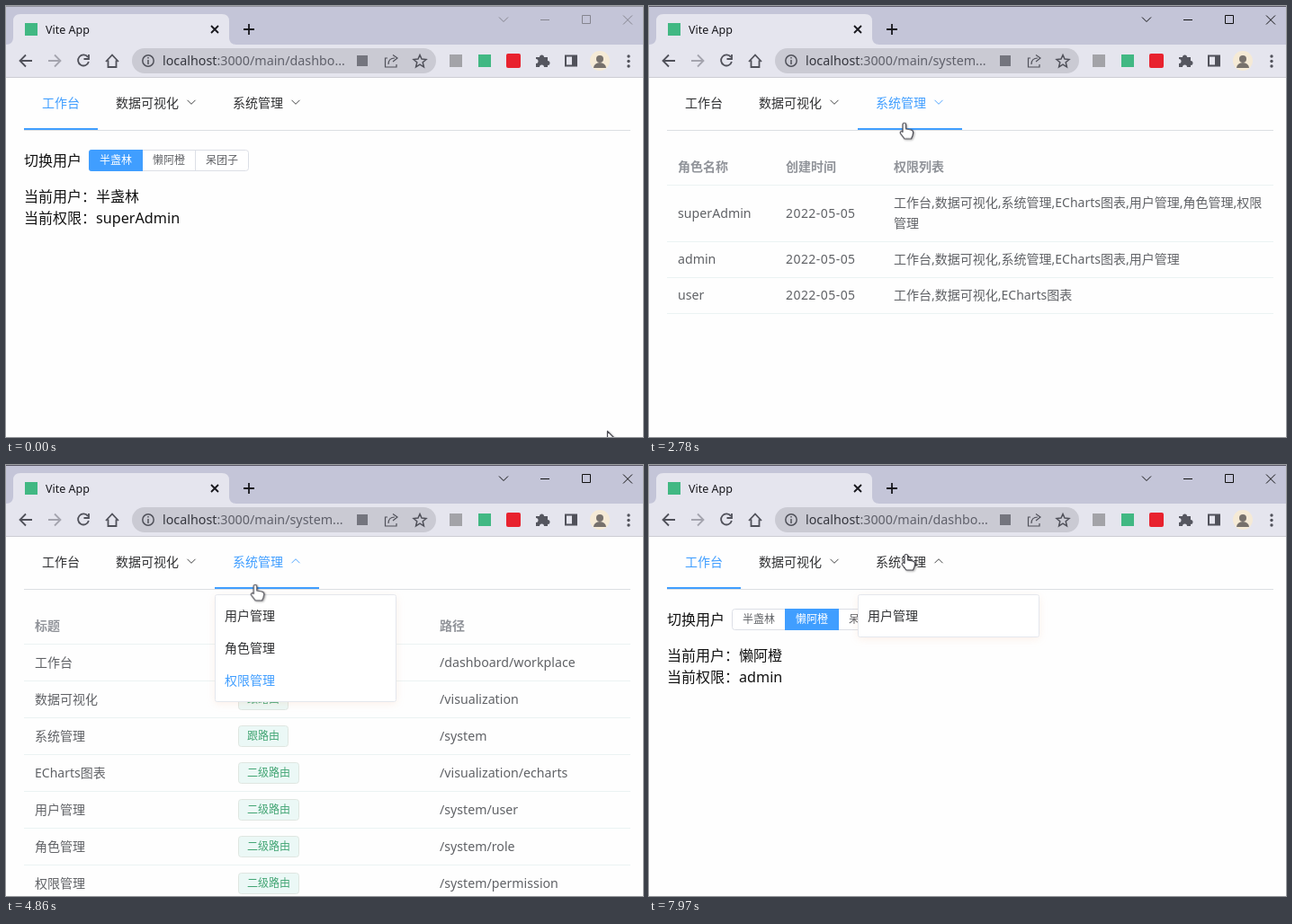
Animation, 708 px wide and 480 px high, one loop 8000 ms. Source, as an HTML page:

```html
<!DOCTYPE html>
<html lang="zh-CN">
<head>
<meta charset="utf-8">
<title>Vite App</title>
<style>
html, body { margin: 0; width: 100%; height: 100%; overflow: hidden; background: #fefefe; }
svg { display: block; }
text { fill: currentColor; font-family: "Noto Sans", "Noto Sans CJK SC", "Noto Sans CJK", sans-serif; font-size: 14px; white-space: pre; }
.line { fill: none; stroke: currentColor; }
.small { font-size: 12px; }
.big { font-size: 16px; }
.bigLatin { font-size: 16.2px; }
.head { font-weight: 700; color: #909399; }
.cell { color: #606266; }
.latin { font-size: 14.2px; }
.date { letter-spacing: .45px; }
.rule { stroke: #ebf3f3; }
.chevron { fill: none; stroke: currentColor; stroke-opacity: 1; stroke-width: .9; }
.bar { stroke: #409eff; stroke-width: 2; }
.panel { fill: #fff; stroke: #e4e7ed; filter: drop-shadow(0 2px 4px #f0a07026); }
.cursor path { fill: #fff; stroke: #4a4a52; stroke-width: 1.2; stroke-linejoin: round; }

/* Every animation shares one 8 s loop: 1% = 80 ms */
.fx { animation: 8s linear infinite; }
.step { animation-timing-function: step-end; }
.focus { animation-name: focus; }
.edge { animation-name: edge; }
.work { animation-name: work; }
.vis { animation-name: vis; }
.sys { animation-name: sys; }
.role { animation-name: role; }
.perm { animation-name: perm; }
.user { animation-name: user; }
.first { animation-name: first; }
.second { animation-name: second; }
.navWork { animation-name: navWork; }
.navVis { animation-name: navVis; }
.navSys { animation-name: navSys; }
.flipVis { animation-name: flipVis; }
.flipSys { animation-name: flipSys; }
.hoverWork { animation-name: hoverWork; }
.dropVis { animation-name: dropVis; }
.dropSys { animation-name: dropSys; }
.dropOne { animation-name: dropOne; }
.hoverVis { animation-name: hoverVis; }
.hoverSys { animation-name: hoverSys; }
.itemRole { animation-name: itemRole; }
.itemPerm { animation-name: itemPerm; }
.btnA { animation-name: btnA; }
.btnB { animation-name: btnB; }
.move { animation-name: move; }
.hand { animation-name: hand; }
.arrow { animation-name: arrow; }
.ring { animation-name: ring; }

@keyframes focus { 0% { color: #85858f } 3.75%, 100% { color: #111 } }
@keyframes edge { 0% { color: #90909c } 3.75%, 100% { color: #5c5a68 } }

/* Routes */
@keyframes work { 0%, 74.75%, 100% { opacity: 1 } 17.5% { opacity: 0 } }
@keyframes vis { 0%, 32.1%, 100% { opacity: 0 } 17.5% { opacity: 1 } }
@keyframes sys { 0%, 74.75%, 100% { opacity: 0 } 32.1% { opacity: 1 } }
@keyframes role { 0%, 49.75%, 100% { opacity: 0 } 32.1% { opacity: 1 } }
@keyframes perm { 0%, 64.75%, 100% { opacity: 0 } 49.75% { opacity: 1 } }
@keyframes user { 0%, 74.75%, 100% { opacity: 0 } 64.75% { opacity: 1 } }
@keyframes first { 0% { opacity: 1 } 90.4%, 100% { opacity: 0 } }
@keyframes second { 0% { opacity: 0 } 90.4%, 100% { opacity: 1 } }

/* Menu bar */
@keyframes navWork {
  0%, 17.5%, 78%, 100% { color: #409eff; stroke-opacity: 1 }
  20.5%, 74.75% { color: #303133; stroke-opacity: 0 }
}
@keyframes navVis {
  0%, 17.5%, 34.4%, 100% { color: #303133; stroke-opacity: 0 }
  20.5%, 32.1% { color: #409eff; stroke-opacity: 1 }
}
@keyframes navSys {
  0%, 32.1%, 77.5%, 100% { color: #303133; stroke-opacity: 0 }
  34.4%, 74.75% { color: #409eff; stroke-opacity: 1 }
}
@keyframes flipVis { 0%, 9.5%, 23.5%, 100% { transform: rotate(0) } 12%, 20.5% { transform: rotate(180deg) } }
@keyframes flipSys {
  0%, 21.8%, 34.4%, 36.5%, 52%, 53%, 67%, 93%, 100% { transform: rotate(0) }
  24.5%, 32%, 39.5%, 50.7%, 54.7%, 64.75%, 96%, 99.99% { transform: rotate(180deg) }
}
@keyframes hoverWork { 0%, 69.5%, 77.3%, 100% { opacity: 0 } 71.3%, 74.8% { opacity: 1 } }

/* Drop-downs */
@keyframes dropVis {
  0%, 13%, 20.4%, 100% { opacity: 0; transform: scaleY(.3) }
  15.5%, 18% { opacity: 1; transform: none }
}
@keyframes dropSys {
  0%, 24.4%, 34%, 40%, 52%, 57.2%, 67%, 100% { opacity: 0; transform: scaleY(.3) }
  27.2%, 32.1%, 43%, 50.7%, 60%, 64.75% { opacity: 1; transform: none }
}
@keyframes dropOne {
  0%, 96.2%, 100% { opacity: 0; transform: scaleY(.3) }
  99.3%, 99.99% { opacity: 1; transform: none }
}
@keyframes hoverVis { 0%, 15%, 100% { opacity: 0 } 16.3%, 21% { opacity: 1 } }
@keyframes hoverSys {
  0%, 35%, 53% { opacity: 0; transform: none }
  28.8%, 42.6%, 61% { opacity: 1; transform: none }
  30%, 44.4% { opacity: 1; transform: translateY(36px) }
  46.6% { opacity: 1; transform: translateY(72px) }
  68%, 100% { opacity: 0; transform: none }
}
@keyframes itemRole { 0%, 51.5%, 100% { color: #303133 } 32.1% { color: #409eff } }
@keyframes itemPerm { 0%, 66%, 100% { color: #303133 } 51.5% { color: #409eff } }

/* User switch */
@keyframes btnA {
  0%, 87.5% { color: #fff; fill-opacity: 1 }
  91%, 100% { color: #606266; fill-opacity: 0 }
}
@keyframes btnB {
  0%, 85.8% { color: #606266; fill-opacity: 0 }
  86.6%, 87.5% { color: #409eff; fill-opacity: 0 }
  91%, 100% { color: #fff; fill-opacity: 1 }
}

/* Pointer */
@keyframes move {
  0%, .875% { transform: translate(668px, 473px) }
  3.75% { transform: translate(560px, 380px) }
  7.5% { transform: translate(290px, 175px) }
  10.4% { transform: translate(165px, 113px) }
  14.4% { transform: translate(165px, 118px) }
  16.5% { transform: translate(166px, 166px) }
  17.4% { transform: translate(167px, 168px) }
  20.9% { transform: translate(240px, 125px) }
  24.4%, 27% { transform: translate(283px, 110px) }
  30.6%, 32.1% { transform: translate(282px, 203px) }
  34.75% { transform: translate(284px, 130px) }
  36.2%, 41% { transform: translate(284px, 108px) }
  45% { transform: translate(278px, 200px) }
  47.5%, 49.5% { transform: translate(276px, 239px) }
  50.5% { transform: translate(276px, 198px) }
  52.1% { transform: translate(281px, 129px) }
  54.7%, 58.5% { transform: translate(284px, 91px) }
  62.5%, 65% { transform: translate(272px, 165px) }
  67.7% { transform: translate(230px, 145px) }
  72.1% { transform: translate(60px, 119px) }
  73.7%, 77.5% { transform: translate(56px, 115px) }
  79% { transform: translate(75px, 130px) }
  83.2% { transform: translate(308px, 181px) }
  86.6%, 88.4% { transform: translate(185px, 172px) }
  89.5% { transform: translate(195px, 155px) }
  92.5% { transform: translate(278px, 105px) }
  94%, 100% { transform: translate(286px, 99px) }
}
@keyframes arrow {
  0%, 66.25%, 79.25%, 88.9% { opacity: 1 }
  9%, 69.5%, 85.75%, 91.1%, 100% { opacity: 0 }
}
@keyframes hand {
  0%, 66.25%, 79.25%, 88.9% { opacity: 0 }
  9%, 69.5%, 85.75%, 91.1%, 100% { opacity: 1 }
}
@keyframes ring {
  0%, 18.1%, 32.4%, 49.9%, 65.4%, 75.1%, 88.5%, 100% { opacity: 0 }
  15.7%, 30.8%, 48.7%, 63.9%, 73.7%, 87.4% { opacity: .72 }
}
</style>
</head>
<body>
<svg width="708" height="480" viewBox="0 0 708 480">
  <defs>
    <path id="chev" d="M-4.5-2.2 0 2.3 4.5-2.2"/>
  </defs>

  <!-- Browser window -->
  <rect width="708" height="44" fill="#c4c5d8"/>
  <path class="line fx step edge" d="M0 .5H708"/>
  <path d="M0 43c5 0 8-3 8-8V17q0-8 8-8H240q8 0 8 8V35c0 5 3 8 8 8H708V79H0z" fill="#e5e5ee"/>
  <path d="M0 79.5H708" stroke="#cdcdd4"/>
  <rect x="21" y="19" width="14" height="14" fill="#41b883"/>
  <text x="44" y="31" style="font-size:12.5px" color="#17171c">Vite App</text>
  <g class="line" color="#17171c" stroke-width="1.8">
    <path d="M228 22l8 8M236 22l-8 8M264 26H276M270 20V32"/>
  </g>
  <g class="line fx step focus">
    <path d="M548 12.5l5 5 5-5M594 15.5H604M640.5 10.5h9v9h-9zM686 10.5l10 10M696 10.5l-10 10"/>
  </g>
  <g class="line" color="#50515a" stroke-width="1.8">
    <path d="M29 61H16M22 54.5 15.5 61 22 67.5"/>
    <path d="M47 61H60M54 54.5 60.5 61 54 67.5" stroke="#a4a4ae"/>
    <path d="M91 57a6 6 0 1 0 .9 5M92 54v5h-5.5"/>
    <path d="M111 62l7-7.5 7 7.5M113.5 60.5V68h9V60.5"/>
  </g>
  <rect x="140" y="47" width="338" height="28" rx="14" fill="#cacad3"/>
  <g class="line" color="#50515a" stroke-width="1.5">
    <circle cx="158" cy="61" r="6.2"/>
    <path d="M158 60V65M158 57V58.5"/>
    <path d="M424 58H421.5V68H434V65M425 65c0-5 3-7 7-7M430 54.5l5 3.5-5 4" stroke-width="1.2"/>
    <path d="M460 54.5l2 4.5 5 .5-3.800 3.300 1.200 5-4.400-2.700-4.400 2.700 1.200-5-3.800-3.300 5-.5z"/>
  </g>
  <rect x="390" y="55" width="12" height="12" fill="#74757e"/>
  <g color="#5f606a" id="urls"></g>
  <rect x="493" y="54" width="14" height="14" fill="#a3a3a8"/>
  <rect x="525" y="54" width="14" height="14" fill="#41b883"/>
  <rect x="556" y="53" width="16" height="16" rx="2" fill="#e8222e"/>
  <path d="M589 57h4a2.500 2.500 0 0 1 5 0h4v4a2.500 2.500 0 0 1 0 5v2h-4a2.500 2.500 0 0 0-5 0h-4v-4a2.500 2.500 0 0 0 0-5z" fill="#55565f"/>
  <path d="M622 55.5h12v11h-12z" class="line" color="#50515a" stroke-width="2"/>
  <path d="M629 55h6v12h-6z" fill="#50515a"/>
  <circle cx="660" cy="61" r="11" fill="#f5ead6"/>
  <path d="M653 69a7 6 0 0 1 14 0" fill="#77716c"/><circle cx="660" cy="59" r="4" fill="#77716c"/>
  <g fill="#50515a"><circle cx="692" cy="56" r="1.7"/><circle cx="692" cy="61.5" r="1.7"/><circle cx="692" cy="67" r="1.7"/></g>

  <!-- Menu bar -->
  <path d="M20 138.5H694" stroke="#dcdfe3"/>
  <rect class="fx hoverWork" x="20" y="80" width="82" height="58" fill="#ebf8f7"/>
  <g class="fx navWork">
    <text x="40" y="113">工作台</text>
    <path class="bar" d="M20 137H102"/>
  </g>
  <g class="fx navVis">
    <text x="122" y="113">数据可视化</text>
    <path class="bar" d="M102 137H232"/>
    <g transform="translate(206 107)"><use href="#chev" class="chevron fx flipVis"/></g>
  </g>
  <g class="fx navSys">
    <text x="252" y="113">系统管理</text>
    <path class="bar" d="M232 137H348"/>
    <g transform="translate(322 107)"><use href="#chev" class="chevron fx flipSys"/></g>
  </g>

  <!-- Workplace -->
  <g class="fx step work" color="#111">
    <text class="big" x="20" y="178">切换用户</text>
    <rect x="92.5" y="160.5" width="177" height="23" rx="3" fill="#fff" stroke="#dcdfe6"/>
    <path d="M151.5 160V184M210.5 160V184" stroke="#dcdfe6"/>
    <g class="fx btnA">
      <path d="M152 160H95q-3 0-3 3v18q0 3 3 3h57z" fill="#409eff"/>
      <text class="small" x="104" y="176" fill-opacity="1">半盏林</text>
    </g>
    <g class="fx btnB">
      <path d="M151 160h60v24h-60z" fill="#409eff"/>
      <text class="small" x="163" y="176" fill-opacity="1">懒阿橙</text>
    </g>
    <text class="small" x="222" y="176" color="#606266">呆团子</text>
    <text class="big" x="20" y="218">当前用户：</text>
    <text class="big" x="20" y="242">当前权限：</text>
    <g class="fx step first">
      <text class="big" x="100" y="218">半盏林</text>
      <text class="bigLatin" x="100" y="242">superAdmin</text>
    </g>
    <g class="fx step second">
      <text class="big" x="100" y="218">懒阿橙</text>
      <text class="bigLatin" x="100" y="242">admin</text>
    </g>
  </g>

  <!-- Tables -->
  <g class="fx step role" id="roles"></g>
  <g class="fx step perm" id="perms"></g>
  <g class="fx step user" id="users"></g>

  <!-- Drop-downs -->
  <g transform="translate(102 144)" color="#303133"><g class="fx dropVis">
    <rect class="panel" x=".5" y=".5" width="201" height="47" rx="2"/>
    <rect class="fx hoverVis" x="1" y="6" width="200" height="36" fill="#ebf8f7"/>
    <text x="11" y="29">ECharts图表</text>
  </g></g>
  <g transform="translate(232 144)" color="#303133"><g class="fx dropSys">
    <rect class="panel" x=".5" y=".5" width="201" height="119" rx="2"/>
    <rect class="fx step hoverSys" x="1" y="6" width="200" height="36" fill="#ebf8f7"/>
    <text x="11" y="29">用户管理</text>
    <text class="fx step itemRole" x="11" y="65">角色管理</text>
    <text class="fx step itemPerm" x="11" y="101">权限管理</text>
  </g></g>
  <g transform="translate(232 144)" color="#303133"><g class="fx dropOne">
    <rect class="panel" x=".5" y=".5" width="201" height="47" rx="2"/>
    <text x="11" y="29">用户管理</text>
  </g></g>

  <!-- Pointer -->
  <g class="cursor fx move">
    <circle class="fx step ring" cx="-3" cy="-2" r="12" fill="#f9ae4e"/>
    <g style="filter:drop-shadow(1px 1px 1px #0005)">
      <path class="fx step arrow" d="M.5.5V15L4 12l2.200 4 2.500-1.200-1.800-3.800h4z"/>
      <path class="fx step hand" d="M-2 10.500V2.300a1.800 1.800 0 0 1 3.600 0V7l5.400 1q3 .8 2.700 3.500l-.7 3-1.500 3.500H0L-4.600 12a1.500 1.500 0 0 1 2.600-1.500z"/>
    </g>
  </g>
</svg>
<script>
const put = (id, parts) => { document.getElementById(id).innerHTML = parts.flat().join(''); };
const text = (x, y, s, cls = 'cell') => `<text class="${cls}" x="${x}" y="${y}">${s}</text>`;
const rule = y => `<path class="rule" d="M20 ${y + .5}H694"/>`;
const header = (xs, names) => [...names.map((s, i) => text(xs[i], 184, s, 'head')), rule(199)];

const tones = {
  green: ['#ebf8f6', '#dfe6e1', '#43a574'],
  amber: ['#fdf6ec', '#f8e5cd', '#dfa14f'],
  red: ['#fef3ec', '#f6dcd0', '#c0683f'],
};
function tag(x, y, w, h, pad, s, tone) {
  const [bg, border, ink] = tones[tone];
  return `<g color="${ink}"><rect x="${x + .5}" y="${y + .5}" width="${w - 1}" height="${h - 1}" rx="3" fill="${bg}" stroke="${border}"/>`
    + text(x + pad, y + h / 2 + 4, s, 'small') + '</g>';
}

put('urls', [['work', 'dashbo'], ['vis', 'visualiz'], ['sys', 'system']].map(([cls, path]) =>
  `<text class="fx step ${cls}" x="174" y="66" style="font-size:14.3px"><tspan fill="#34353d">localhost</tspan>:3000/main/${path}...</text>`));

const day = '2022-05-05';
const roleCols = [32, 152, 272];
const roleRow = (y, name, rights, bottom) =>
  [text(32, y, name, 'cell latin'), text(152, y, day, 'cell date'), ...rights.map(([ry, s]) => text(272, ry, s)), rule(bottom)];
put('roles', [
  header(roleCols, ['角色名称', '创建时间', '权限列表']),
  roleRow(236, 'superAdmin', [[224, '工作台,数据可视化,系统管理,ECharts图表,用户管理,角色管理,权限'], [247, '管理']], 262),
  roleRow(287, 'admin', [[287, '工作台,数据可视化,系统管理,ECharts图表,用户管理']], 302),
  roleRow(327, 'user', [[327, '工作台,数据可视化,ECharts图表']], 342),
]);

const cols = [32, 258, 482];
const routes = [
  ['工作台', '/dashboard/workplace'],
  ['数据可视化', '/visualization'],
  ['系统管理', '/system'],
  ['ECharts图表', '/visualization/echarts'],
  ['用户管理', '/system/user'],
  ['角色管理', '/system/role'],
  ['权限管理', '/system/permission'],
];
put('perms', [
  header(cols, ['标题', '类型', '路径']),
  routes.map(([title, path], i) => {
    const y = 225 + 41 * i, kind = i < 3 ? '跟路由' : '二级路由';
    return text(32, y, title) + tag(258, y - 17, 20 + 12 * kind.length, 24, 10, kind, 'green')
      + text(482, y, path, 'cell latin') + rule(y + 15);
  }),
]);

const users = [
  ['半盏林', 'superAdmin', 86, 'green'],
  ['懒阿橙', 'admin', 52, 'amber'],
  ['呆团子', 'user', 40, 'red'],
];
put('users', [
  header(cols, ['用户名', '创建时间', '角色']),
  users.map(([name, role, w, tone], i) => {
    const y = 224 + 40 * i;
    return text(32, y, name) + text(258, y, day, 'cell date') + tag(482, y - 14, w, 20, 8, role, tone) + rule(y + 15);
  }),
]);
</script>
</body>
</html>
```
